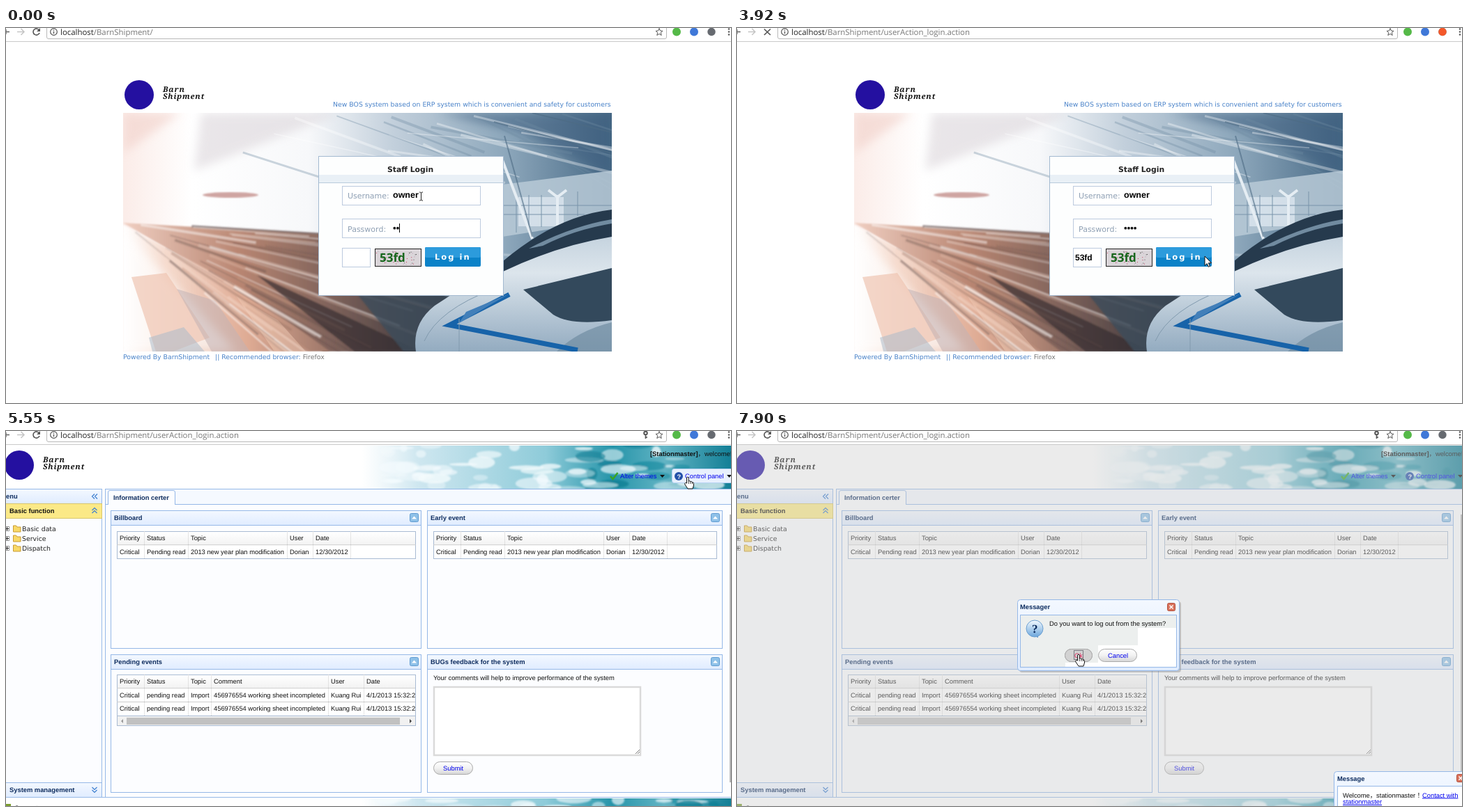
Animation of 1040 by 539 pixels, one loop 8 s. Source, as an HTML page:

```html
<!DOCTYPE html>
<html lang="en">
<head>
<meta charset="utf-8">
<title>Staff login</title>
<style>
html, body { margin: 0; width: 100%; height: 100%; overflow: hidden; background: #fff; }
svg { display: block; width: 1040px; height: 539px; }
text { font: 9.35px "Liberation Sans", Arial, sans-serif; fill: #111; white-space: pre; text-rendering: geometricPrecision; }
.b { font-weight: 700; }
.title { font-weight: 700; fill: #0e2d5f; }
.blue { fill: #0000ee; }
.link { fill: #0000ee; text-decoration: underline; }
.menu { fill: #444; }
.wide { font: 9.35px "DejaVu Sans", sans-serif; fill: #4a83c9; }
.label { font: 11px "DejaVu Sans", sans-serif; fill: #8fa0b4; }
.head { font: 700 10.8px "DejaVu Sans", sans-serif; fill: #222; }
.login { font: 700 11.5px "DejaVu Sans", sans-serif; fill: #fff; letter-spacing: 2px; }
.field { font-weight: 700; font-size: 12.5px; fill: #000; }
.code { font-weight: 700; font-size: 12px; fill: #000; }
.captcha { font: 700 17px "Open Sans", sans-serif; fill: #17661c; }
.url { font: 11.4px "Open Sans", sans-serif; fill: #777; }
.brand { font: italic 700 11px "Noto Serif", serif; fill: #111; letter-spacing: .9px; }
.ask { font: 700 17px "Liberation Serif", serif; fill: #0a2a5c; }
</style>
</head>
<body>
<script>
const LOOP = 8000, LINE = '#95b8e7';

const rect = (x, y, w, h, fill, more = '') =>
  `<rect x="${x}" y="${y}" width="${w}" height="${h}" fill="${fill}" ${more}/>`;
const box = (x, y, w, h, fill, stroke, more = '') =>
  rect(x + .5, y + .5, w - 1, h - 1, fill, `stroke="${stroke}" ${more}`);
const text = (x, y, str, cls = '') => `<text x="${x}" y="${y}" class="${cls}">${str}</text>`;
const path = (d, fill, more = '') => `<path d="${d}" fill="${fill}" ${more}/>`;
const stroke = (d, color, width = 1, more = '') =>
  path(d, 'none', `stroke="${color}" stroke-width="${width}" ${more}`);
const dot = (x, y, r, fill, more = '') => `<circle cx="${x}" cy="${y}" r="${r}" fill="${fill}" ${more}/>`;
const oval = (x, y, rx, ry, fill, more = '') =>
  `<ellipse cx="${x}" cy="${y}" rx="${rx}" ry="${ry}" fill="${fill}" ${more}/>`;
const group = (more, ...parts) => `<g ${more}>${parts.join('')}</g>`;
const during = (from, to, ...parts) => group(`data-on="${from},${to}" visibility="hidden"`, ...parts);
const gradient = (id, vertical, ...stops) =>
  `<linearGradient id="${id}" x2="${vertical ? 0 : 1}" y2="${vertical ? 1 : 0}">` +
  stops.map(([at, color, alpha = 1]) =>
    `<stop offset="${at}" stop-color="${color}" stop-opacity="${alpha}"/>`).join('') + '</linearGradient>';
const repeat = (n, make) => Array.from({ length: n }, (_, i) => make(i)).join('');

function seeded(seed) {
  return (min = 0, max = 1) => {
    seed = (seed * 16807) % 2147483647;
    return min + (max - min) * seed / 2147483647;
  };
}

const defs = `<defs>${[
  gradient('sky', 0, [0, '#fbece8'], [.14, '#fff'], [.38, '#f7f8fa'], [.55, '#c3d0dc'], [.78, '#8ea8bc'], [1, '#486a86']),
  gradient('rust', 0, [0, '#f0cfc2'], [.35, '#b98672'], [.65, '#7b6059'], [1, '#2f2f36']),
  gradient('peach', 0, [0, '#fff'], [.2, '#f6dccf'], [.6, '#dfab94'], [1, '#9c7668']),
  gradient('body', 1, [0, '#b4c6d5'], [.45, '#dce5ec'], [1, '#93abc0']),
  gradient('sea', 0, [0, '#dceef5', 0], [.15, '#cfe7f0'], [.5, '#8ecbd9'], [.68, '#2594a9'], [.82, '#63b4c4'], [1, '#137f96']),
  gradient('bar', 1, [0, '#f3f8ff'], [1, '#e0ecff']),
  gradient('pill', 1, [0, '#fff'], [.5, '#f2f2f2'], [1, '#d6d6d6']),
  gradient('grid', 1, [0, '#fff'], [1, '#f3f3f3']),
  gradient('bubble', 1, [0, '#f4faff'], [1, '#6ba6dc']),
].join('')}
<filter id="soft" x="-20%" y="-20%" width="140%" height="140%"><feGaussianBlur stdDeviation="7"/></filter>
<filter id="haze"><feGaussianBlur stdDeviation="1.2"/></filter>
<clipPath id="photo"><rect x="168" y="122" width="701" height="343"/></clipPath>
<clipPath id="top"><rect y="21" width="1040" height="62"/></clipPath>
<clipPath id="foot"><rect y="528" width="1040" height="11"/></clipPath>
</defs>`;

function brand(x, y) {
  return dot(x + 23, y + 21, 21, '#2410a0') + text(x + 57, y + 17, 'Barn', 'brand') + text(x + 57, y + 27, 'Shipment', 'brand');
}

function browser() {
  return rect(0, 0, 1040, 20, '#fff') + rect(0, 19, 1040, 1, '#c9c9c9') +
    stroke('M58.5 0V13q0 2.500 2.500 2.500H945q2.500 0 2.500 -2.500V0', '#b9b9b9') +
    stroke('M0 5.500H5M0 2V9', '#666', 1.4) + stroke('M16 5.500H26M21.500 1L26 5.500 21.500 10', '#c5c5c5', 1.5) +
    during(0, 3770, reload()) +
    during(3770, 4780, stroke('M39 1.500L48 10M48 1.500L39 10', '#555', 1.7)) +
    during(4780, LOOP, reload()) +
    dot(68.5, 5.5, 4.8, 'none', 'stroke="#555" stroke-width="1.2"') + stroke('M68.500 4.700V8.300M68.500 2.500V3.700', '#555', 1.3) +
    during(0, 3920, url('')) + during(3920, LOOP, url('userAction_login.action')) +
    during(4470, LOOP, dot(917.5, 3, 2.3, 'none', 'stroke="#555" stroke-width="2"') + stroke('M917.500 5V11M918 9H920', '#555', 1.7)) +
    path('M937 .5L938.500 4 942 4.300 939.300 6.700 940.200 10.500 937 8.400 933.800 10.500 934.700 6.700 932 4.300 935.500 4Z', '#fff', 'stroke="#555"') +
    dot(962, 5.5, 6, '#55b948') + dot(987, 5.5, 6, '#3f78d8') + dot(1012, 5.5, 5.7, '#666a70') +
    during(3920, 4470, dot(1012, 5.5, 5.7, '#f4582a')) +
    repeat(3, i => dot(1037, 1.5 + i * 4, 1.2, '#555'));
}
function reload() {
  return stroke('M47.500 3A4.600 4.600 0 1 0 48 7', '#555', 1.6) + path('M49 0V5H44Z', '#555');
}
function url(tail) {
  return `<text x="78" y="9.500" class="url"><tspan fill="#222">localhost</tspan>/BarnShipment/${tail}</text>`;
}

function trainPhoto() {
  const r = seeded(41);
  const rays = repeat(46, () => {
    const angle = r(.06, .72), start = r(20, 220), end = start + r(120, 400);
    const at = d => `${(168 + d * Math.cos(angle)).toFixed(1)} ${(279 + d * Math.sin(angle)).toFixed(1)}`;
    const color = ['#fff', '#f4d8c8', '#8e6a5c', '#c99a84', '#5d4a48'][Math.floor(r(0, 5))];
    return stroke(`M${at(start)}L${at(end)}`, color, r(1, 4).toFixed(1), `opacity="${r(.2, .6).toFixed(2)}"`);
  });
  const streaks = repeat(22, i => {
    const x = r(330, 800), y = r(122, 185);
    return stroke(`M${x} ${y}l${r(100, 260)} ${r(20, 90)}`, i % 2 ? '#fff' : '#6d8aa2', r(1, 4), 'opacity=".35"');
  });
  return group('clip-path="url(#photo)"',
    rect(168, 122, 701, 343, 'url(#sky)'),
    path('M620 122H869V215L740 150Z', '#39597a', 'opacity=".5" filter="url(#soft)"'),
    path('M168 122H250L168 180Z', '#f3d5cf', 'filter="url(#soft)" opacity=".7"'),
    path('M280 122H480L270 205Z', '#d9d3d8', 'filter="url(#soft)" opacity=".55"'),
    streaks,
    path('M712 225L869 205V275L712 300Z', '#b9cad7', 'opacity=".85"'),
    rect(735, 243, 65, 42, '#dce7ef', 'opacity=".8"'),
    stroke('M712 255H869M712 268H830M732 245V294M750 240V290M768 240V286M820 235V270', '#7893aa'),
    stroke('M778 233L791 243 804 233M791 240V290M712 190L755 303', '#e5edf3', 4),
    stroke('M715 155L755 300M700 135L869 180M755 122L869 150', '#4e6b84', 2, 'opacity=".6"'),
    oval(322, 240, 40, 4, '#cfa5a2', 'filter="url(#haze)"'),
    path('M168 280L450 296 640 390V465H455L330 375Z', 'url(#rust)', 'filter="url(#haze)"'),
    path('M168 283L340 375 465 465H168Z', 'url(#peach)', 'filter="url(#haze)"'),
    path('M168 290L330 465H168Z', '#fff', 'opacity=".65" filter="url(#soft)"'),
    path('M180 358L230 352 292 445 240 465H215Z', '#efc2ae', 'opacity=".65"'),
    path('M245 375L300 392 350 465H295Z', '#c3b3b5', 'opacity=".55"'),
    path('M330 385L390 420 430 465H385Z', '#f1cbb6', 'opacity=".5"'),
    path('M205 445L255 430 285 465H210Z', '#aebccb', 'opacity=".55"'),
    group('filter="url(#haze)"', rays),
    path('M360 355L595 465H500Z', '#332b2d', 'opacity=".65" filter="url(#haze)"'),
    path('M505 384H720L600 430V465H570Z', '#3d4d5c', 'opacity=".8" filter="url(#haze)"'),
    path('M588 465Q582 425 615 399Q690 350 735 323Q800 275 869 260V465Z', 'url(#body)'),
    path('M713 335Q790 270 869 261V300Q790 313 713 350Z', '#263a4d'),
    path('M750 317Q810 285 869 275V281Q815 290 770 313Z', '#718ba0'),
    path('M742 376L869 345V420Q810 428 785 412Z', '#33495c'),
    path('M790 465Q820 435 869 423V465Z', '#718da3', 'opacity=".7"'),
    stroke('M722 383L636 427 820 463', '#1763a9', 7),
    path('M722 382L660 408 650 424Z', '#427fb9'),
    stroke('M650 418V465M600 450Q620 405 700 375', '#819aae'));
}

function captcha() {
  const r = seeded(9);
  const specks = repeat(55, i =>
    rect(r(531, 593).toFixed(1), r(319, 340).toFixed(1), 1, 1, ['#c43b5c', '#555', '#b89ab5'][i % 3]));
  return box(529, 317, 67, 26, '#dad5d9', '#222') + specks + text(536, 336, '53fd', 'captcha');
}

function caret(from, to, x, y) {
  return during(from, to, rect(x, y, 1, 13, '#000'));
}

function suggestions(items, height) {
  return box(482, 343, 40, height, '#fff', '#aaa') + items.map((s, i) => text(485, 356 + i * 18.5, s)).join('');
}

function loginPage() {
  const input = (x, y, w) => box(x, y, w, 28, '#fff', '#bccade');
  const code = '53fd', typed = [1470, 1880, 2280, 2530, 4320], ends = [493, 499, 503, 509];
  return brand(168, 75) +
    text(469, 113, 'New BOS system based on ERP system which is convenient and safety for customers', 'wide') +
    trainPhoto() +
    box(448, 184, 266, 201, '#fdfefe', '#a3b9d0') + rect(449, 211, 264, 11, '#e9f0f6') + rect(449, 222, 264, 1, '#b9cbdc') +
    text(547, 207, 'Staff Login', 'head') +
    input(482, 227, 199) + text(490, 245, 'Username:', 'label') + text(555, 244, 'owner', 'field') +
    input(482, 274, 199) + text(490, 292.5, 'Password:', 'label') +
    [0, 0, 150, 430].map((t, i) => during(t, 4320, dot(557.3 + i * 4.6, 287.7, 1.9, '#111'))).join('') +
    caret(0, 150, 564, 281) + caret(150, 430, 568, 281) + caret(430, 800, 573, 281) +
    input(482, 316, 41) + captcha() +
    rect(601, 315, 80, 28, '#0b82c8', 'rx="2"') + rect(601, 315, 80, 15, '#2c9bdc', 'rx="2"') +
    text(615, 333, 'Log in', 'login') +
    caret(800, 1330, 486, 323) +
    [...code].map((_, i) => during(typed[i], typed[i + 1], text(485, 334, code.slice(0, i + 1), 'code')) +
      caret(typed[i], i < 3 ? typed[i + 1] : 3030, ends[i], 323)).join('') +
    during(1470, 1880, suggestions(['53a8', '5k2e', '58cf', '5d7b', '5e4n', '52xa'], 113)) +
    during(1880, 2280, suggestions(['53a8'], 19)) +
    text(168, 476, 'Powered By BarnShipment', 'wide') +
    `<text x="300" y="476" class="wide">|| Recommended browser: <tspan fill="#777">Firefox</tspan></text>`;
}

function clouds(y, clip, seed) {
  const r = seeded(seed);
  return group(`clip-path="url(#${clip})"`,
    rect(510, y, 530, 63, 'url(#sea)'),
    group('filter="url(#haze)"', repeat(65, i => {
      const x = r(545, 1040), deep = i % 3 === 0 && x > 800;
      return oval(x, y + r(0, 66), r(5, 28), r(2, 9), deep ? '#0e7f95' : '#f4fbfd', `opacity="${r(.35, .8).toFixed(2)}"`);
    })));
}

function chevrons(x, y, turn) {
  return group(`transform="translate(${x} ${y}) rotate(${turn})"`, stroke('M-3.500 0L0 -3.500 3.500 0M-3.500 4L0 .5 3.500 4', '#3d7fd0', 1.2));
}

function panel(x, y, w, title) {
  return box(x, y, w, 199, '#fcfdff', LINE) + rect(x + 1, y + 1, w - 2, 20, 'url(#bar)') + rect(x, y + 21, w, 1, LINE) +
    text(x + 5, y + 14, title, 'title') +
    box(x + w - 17, y + 4, 13, 13, '#8fc1e8', '#5e9bd1', 'rx="2"') + path(`M${x + w - 14} ${y + 12.5}l3.500 -4 3.500 4z`, '#fff');
}

function table(x, y, w, edges, rows) {
  const height = rows.length * 20;
  const lines = edges.map(e => stroke(`M${x + e + .5} ${y}v${height}`, '#ccc', 1, 'stroke-dasharray="1 1"')).join('');
  return box(x, y, w, height, '#fff', '#a9bbd3') + rect(x + 1, y + 1, w - 2, 18, 'url(#grid)') + lines +
    rows.map((row, i) => (i ? stroke(`M${x} ${y + i * 19.7}h${w}`, '#ccc') : '') +
      row.map((cell, c) => text(x + (c ? edges[c - 1] : 0) + 4, y + 13 + i * 19.6, cell)).join('')).join('');
}

const notices = x => table(x, 144, x < 600 ? 429 : 407, [39, 102, 244, 281, 335], [
  ['Priority', 'Status', 'Topic', 'User', 'Date'],
  ['Critical', 'Pending read', '2013 new year plan modification', 'Dorian', '12/30/2012']]);

function pending() {
  const row = ['Critical', 'pending read', 'Import', '456976554 working sheet incompleted', 'Kuang Rui', '4/1/2013 15:32:2'];
  return table(159, 350, 429, [39, 102, 135, 303, 354], [['Priority', 'Status', 'Topic', 'Comment', 'User', 'Date'], row, row]) +
    rect(588, 351, 7, 72, '#fcfdff') + rect(587, 350, 1, 74, '#a9bbd3') +
    box(159, 409, 429, 15, '#f1f1f1', '#a9bbd3') + rect(173, 412, 392, 10, '#c1c1c1') +
    path('M168 414v6l-3 -3z', '#999') + path('M579 414v6l3 -3z', '#444');
}

function pill(x, y, w, label, tx, cls = 'blue', fill = 'url(#pill)') {
  return box(x, y, w, 19, fill, '#aaa', 'rx="9"') + text(tx, y + 12.5, label, cls);
}

function feedback() {
  return text(613, 358, 'Your comments will help to improve performance of the system') +
    rect(614, 368, 296, 98, '#fff', 'stroke="#dadada" stroke-width="2.500"') +
    stroke('M903 464l6 -6M906 464l3 -3', '#777') + pill(613, 475, 57, 'Submit', 627);
}

function loading(x, y) {
  return dot(x + 6, y, 4.5, 'none', 'stroke="#d3dbe6" stroke-width="2"') +
    stroke(`M${x + 6} ${y - 4.5}a4.500 4.500 0 0 0 -3 8`, '#446a9c', 2) + text(x + 15, y + 3, 'Loading...');
}

function controlLinks() {
  return stroke('M867 65l3.500 4 7 -9', '#3aa524', 2.5) + text(881, 68, 'Alter themes', 'blue') + path('M938 63h7l-3.500 4z', '#111') +
    dot(965, 65, 6, '#2350a8') + `<text x="962.500" y="68.500" class="b" style="fill:#fff">?</text>` +
    text(974, 68, 'Control panel', 'blue') + path('M1034 63h7l-3.500 4z', '#111');
}

function controlMenu() {
  const hover = (from, to, y) => during(from, to, box(867, y, 175, 18, '#e9f1fd', '#c5d9f3'));
  return during(5430, 7140, box(955, 54, 88, 21, '#e8f0fd', '#b7d2f4', 'rx="3"')) +
    controlLinks() +
    during(5560, 7140,
      rect(868, 77, 174, 63, '#888', 'opacity=".25"'), box(866, 75, 176, 63, '#fbfbfb', '#ccc'),
      rect(867, 76, 20, 61, '#f1f1f1'), rect(887, 76, 1, 61, '#e0e0e0'), rect(888, 113, 152, 1, '#dedede'),
      hover(6460, 6590, 76), hover(6590, 6720, 94), hover(6720, 7140, 117),
      text(890.5, 88, 'Modify password', 'menu'), text(890.5, 105, 'Contact with stationmaster', 'menu'), text(890.5, 129, 'Log out'));
}

function dashboard() {
  const folder = (y, label) => box(-2, y - 3, 7, 7, '#fff', '#999') + stroke(`M-1 ${y + .5}h5M1.500 ${y - 2}v5`, '#222') +
    path(`M10.500 ${y - 4}h4l1.500 2h5v7h-10.500z`, '#f8d968', 'stroke="#c99b33"') +
    `<text x="23" y="${y + 3.5}" class="wide" style="fill:#222">${label}</text>`;
  const spinners = [[159, 149], [613, 149], [159, 356], [613, 356]];
  return rect(0, 20, 1040, 519, '#fff') + clouds(20, 'top', 77) + brand(-4, 28) +
    `<text x="924" y="36"><tspan class="b">[Stationmaster]</tspan>，welcome!</text>` +
    box(-1, 83, 139, 444, '#fcfdff', LINE) + rect(0, 84, 137, 20, 'url(#bar)') + text(-7.8, 97, 'Menu', 'title') + chevrons(127, 94, -90) +
    box(-1, 104, 139, 22, '#fbe987', '#d8c66d') + `<text x="5" y="118" class="b">Basic function</text>` + chevrons(127, 114, 0) +
    folder(140, 'Basic data') + folder(154, 'Service') + folder(168, 'Dispatch') +
    box(-1, 505, 139, 22, 'url(#bar)', LINE) + text(5, 519, 'System management', 'title') + chevrons(127, 516, 180) +
    box(142, 83, 900, 444, '#fcfdff', LINE) + rect(143, 84, 897, 21, '#f5f9ff') + rect(143, 105, 897, 1, LINE) +
    path('M146.500 106V88q0 -2.500 2.500 -2.500H240q2.500 0 2.500 2.500V106', '#fcfdff', `stroke="${LINE}"`) + text(154, 98.5, 'Information certer', 'title') +
    panel(150, 114, 446, 'Billboard') + panel(604, 114, 424, 'Early event') +
    panel(150, 321, 446, 'Pending events') + panel(604, 321, 424, 'BUGs feedback for the system') +
    during(4780, 4900, spinners.map(p => loading(...p)).join('')) +
    during(4900, LOOP, notices(159), notices(613), pending(), feedback()) +
    rect(1038, 120, 2, 385, '#b5b5b5') + rect(0, 526, 1040, 1, LINE) +
    clouds(526, 'foot', 31) + rect(0, 536, 7, 3, '#7c9e2e') + text(12, 545, 'Current user : owner', 'b') +
    controlMenu();
}

function closeButton(x, y) {
  return box(x, y, 12, 12, '#d9735c', '#b4503e', 'rx="2"') + stroke(`M${x + 3.5} ${y + 3.5}l5 5m0 -5l-5 5`, '#fff', 1.5);
}

function dialog() {
  return rect(405, 245, 232, 102, '#777', 'opacity=".35" rx="4"') + box(402, 242, 233, 103, 'url(#bar)', LINE, 'rx="4"') +
    text(406, 256, 'Messager', 'title') + closeButton(617, 247) +
    box(406, 264, 225, 76, '#ecefee', LINE) +
    during(7900, LOOP, rect(575, 283, 55, 56, '#fff'), rect(518, 308, 57, 31, '#fff'), rect(471, 333, 47, 6, '#fff')) +
    path('M424 294l8 3v-5z', '#4b87c4') + dot(427, 284, 12, 'url(#bubble)', 'stroke="#6c9fd0"') + text(423, 290, '?', 'ask') +
    text(448, 280, 'Do you want to log out from the system?') +
    pill(470, 313, 40, 'Ok', 484) + pill(518, 313, 56, 'Cancel', 532) +
    during(7780, LOOP, pill(470, 313, 40, 'Ok', 484, 'blue" style="fill:#e0245a', '#d2d2d2')) +
    box(483, 315, 14, 14, 'none', '#223', 'stroke-dasharray="1 1"');
}

function message() {
  return box(0, 0, 190, 90, 'url(#bar)', LINE, 'rx="4"') + text(5, 13.5, 'Message', 'title') + closeButton(176, 4) +
    box(5, 21, 180, 64, '#fff', LINE) + text(13, 37.5, 'Welcome，stationmaster！') +
    text(127, 37.5, 'Contact with', 'link') + text(13, 47, 'stationmaster', 'link');
}

const cursors = {
  beam: stroke('M-2 -6H-.5L.5 -5 1.500 -6H3M.5 -5V5M-2 6H-.5L.5 5 1.500 6H3', '#222'),
  arrow: path('M0 0V13.500L3.200 10.600 5.300 15.300 7.400 14.400 5.400 9.800H9.600Z', '#fff', 'stroke="#111"'),
  hand: path('M-1.500 9V1Q0 -1 1.200 1V6Q3 5 4 6.800 6 6 6.500 7.800 8.500 7.500 8.500 9.500V12L7 17H0L-4 11Q-5 9 -3.500 8.500Z', '#fff', 'stroke="#111"') +
    stroke('M1.200 6V10M4 7V10M6.500 8V10', '#111', .8),
};

// time, x, y, shape
const pointer = [
  [0, 595, 242, 'beam'], [3150, 625, 258, 'beam'], [3270, 668, 288, 'arrow'], [3390, 711, 318, 'arrow'],
  [3530, 704, 326, 'arrow'], [3650, 686, 329, 'hand'], [3770, 671, 328, 'arrow'],
  [4780, 690, 318, 'hand'], [4900, 755, 250, 'arrow'], [5030, 835, 165, 'arrow'], [5150, 900, 110, 'arrow'], [5280, 945, 80, 'arrow'],
  [5430, 978, 66, 'hand'], [5560, 990, 64, 'hand'], [5690, 988, 65, 'hand'], [5810, 986, 66, 'hand'],
  [6460, 975, 84, 'hand'], [6590, 958, 102, 'hand'], [6720, 942, 123, 'hand'], [6860, 943, 125, 'hand'],
  [7140, 942, 124, 'arrow'], [7410, 900, 160, 'arrow'], [7530, 760, 235, 'arrow'], [7650, 600, 300, 'arrow'],
  [7780, 500, 322, 'hand'], [7900, 490, 321, 'hand'],
];
const messageTop = [[0, 540], [7530, 534], [7650, 521], [7780, 506], [7900, 489]];

document.body.innerHTML = `<svg viewBox="0 0 1040 539">${defs}` +
  rect(0, 0, 1040, 539, '#fff') +
  during(0, 4320, loginPage()) +
  during(4780, LOOP, dashboard()) +
  during(7140, LOOP, rect(0, 20, 1040, 519, '#ccc', 'opacity=".4"'), dialog(), group('id="message"', message())) +
  browser() +
  group('id="pointer"', Object.entries(cursors).map(([name, art]) => group(`data-cursor="${name}"`, art)).join('')) +
  '</svg>';

const timed = [...document.querySelectorAll('[data-on]')].map(el => [el, ...el.dataset.on.split(',').map(Number)]);
const shapes = [...document.querySelectorAll('[data-cursor]')];
const pointerEl = document.getElementById('pointer'), messageEl = document.getElementById('message');
const stepAt = (steps, t) => steps.findLast(s => s[0] <= t);
const start = performance.now();

function draw(now) {
  const t = Math.max(0, now - start) % LOOP;
  for (const [el, from, to] of timed) el.style.display = t >= from && t < to ? '' : 'none';
  const [, x, y, shape] = stepAt(pointer, t);
  pointerEl.setAttribute('transform', `translate(${x} ${y})`);
  for (const el of shapes) el.style.display = el.dataset.cursor === shape ? '' : 'none';
  messageEl.setAttribute('transform', `translate(856 ${stepAt(messageTop, t)[1]})`);
  requestAnimationFrame(draw);
}
for (const [el] of timed) el.removeAttribute('visibility');
draw(start);
</script>
</body>
</html>
```
